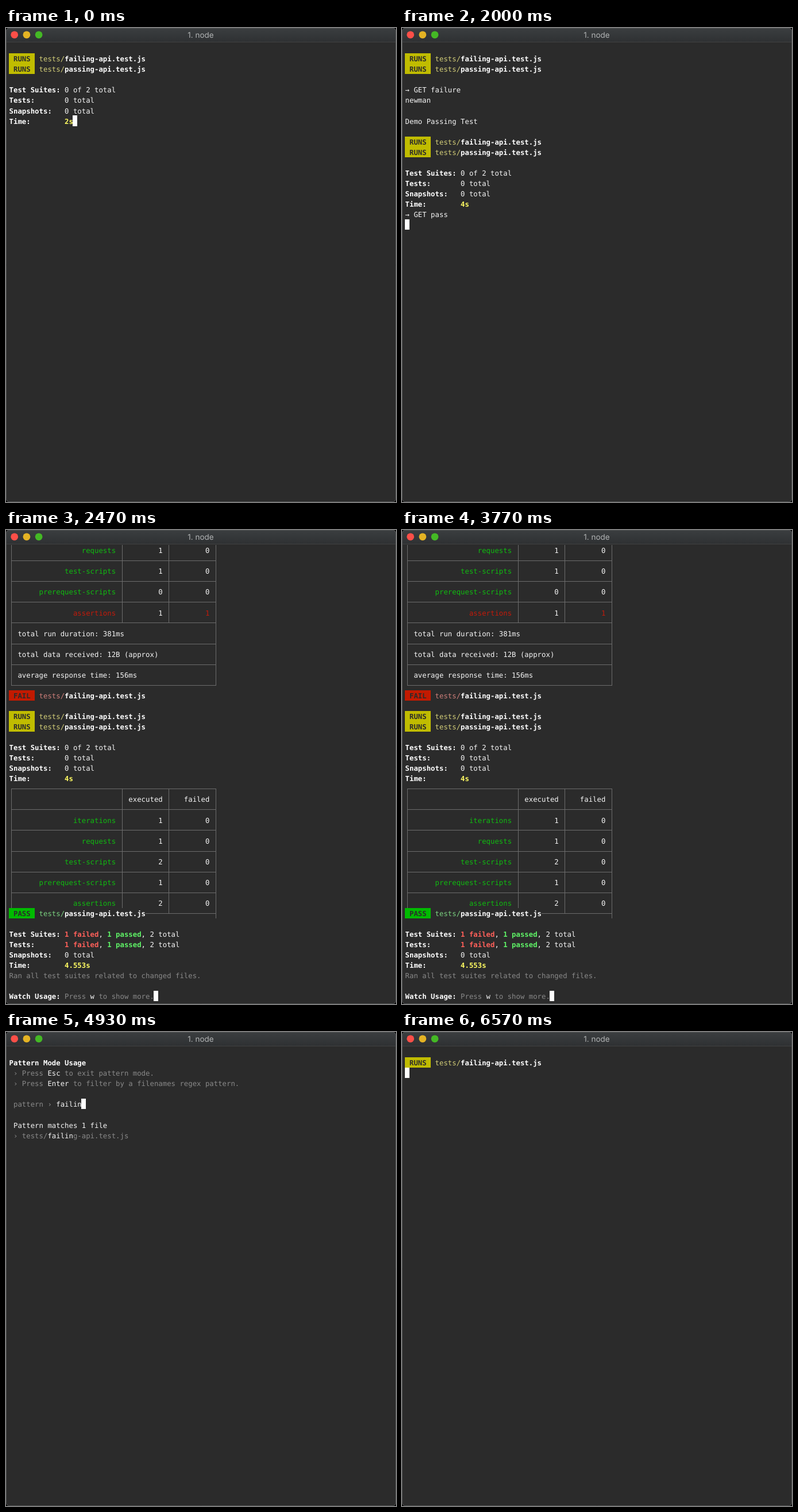
Animation of 679x825 px, one loop 8000 ms. Source, as an HTML page with a canvas:

```html
<!DOCTYPE html>
<html lang="en">
<head>
<meta charset="utf-8">
<title>Terminal</title>
<style>
  html, body { margin: 0; width: 100%; height: 100%; overflow: hidden; background: #000; }
  canvas { display: block; }
</style>
</head>
<body>
<canvas id="stage" width="679" height="825"></canvas>
<script>
const ctx = document.getElementById('stage').getContext('2d');
const W = 679, H = 825, LOOP = 8000;
const LEFT = 5.6, TOP = 26.6, CELL_W = 7.42, CELL_H = 18.05;
const MONO = '12.32px "DejaVu Sans Mono", "Liberation Mono", monospace';

// Style letter -> [text colour, bold, background]
const STYLES = {
  n: ['#f6f6f6'],
  b: ['#ffffff', true],
  d: ['#898989'],
  k: ['#5f5f5f'],
  l: ['#6c6c6c'],
  g: ['#10bb10'],
  r: ['#c41a0a'],
  o: ['#c2be1c'],
  y: ['#d3ce78'],
  p: ['#cf7f7a'],
  q: ['#7bd280'],
  t: ['#fffb62', true],
  e: ['#ff605a', true],
  s: ['#5ff567', true],
  Y: ['#2b2b2b', true, '#c0bc00'],
  R: ['#2b2b2b', true, '#c21a00'],
  G: ['#2b2b2b', true, '#00ba00']
};

// Box-drawing characters as the sides their strokes reach
const BOX = {
  '─': 'LR', '│': 'UD', '┌': 'RD', '┐': 'LD', '└': 'RU', '┘': 'LU',
  '├': 'UDR', '┤': 'UDL', '┬': 'LRD', '┴': 'LRU', '┼': 'LRUD'
};

// Text markup: "~x" switches to style x, "~_" places the cursor
const badge = (style, label, dim, name) =>
  `~${style} ${label} ~n ~${dim}tests/~b${name}-api.test.js`;
const runs = name => badge('Y', 'RUNS', 'y', name);
const bothRun = [runs('failing'), runs('passing')];
const stat = (label, value) => `~b${(label + ':').padEnd(13)}~n${value}`;
const stats = (time, suites = '0 of 2 total', tests = '0 total') => [
  stat('Test Suites', suites), stat('Tests', tests),
  stat('Snapshots', '0 total'), stat('Time', '~t' + time)
];

const rule = ([l, m, n, r]) =>
  '~l' + l + '─'.repeat(25) + m + '─'.repeat(10) + n + '─'.repeat(10) + r;
const row = (label, run, failed, style = 'g', failStyle = 'n') =>
  `~l│~${style}${label.padStart(24)} ~l│~n${run.padStart(9)} ~l│~${failStyle}${failed.padStart(9)} ~l│`;
const note = text => `~l│~n ${text.padEnd(46)}~l│`;
const grid = rows => rows.flatMap((r, i) => i ? [rule('├┼┼┤'), r] : [r]);
const head = row('', 'executed', 'failed');

const failTable = [
  rule('┌┬┬┐'),
  ...grid([
    head, row('iterations', '1', '0'), row('requests', '1', '0'),
    row('test-scripts', '1', '0'), row('prerequest-scripts', '0', '0'),
    row('assertions', '1', '1', 'r', 'r')
  ]),
  rule('├┴┴┤'), note('total run duration: 381ms'),
  rule('├──┤'), note('total data received: 12B (approx)'),
  rule('├──┤'), note('average response time: 156ms'),
  rule('└──┘')
];
const passTable = [
  rule('┌┬┬┐'),
  ...grid([
    head, row('iterations', '1', '0'), row('requests', '1', '0'),
    row('test-scripts', '2', '0'), row('prerequest-scripts', '1', '0'),
    row('assertions', '2', '0')
  ])
];

const waiting = time => ['', ...bothRun, '', ...stats(time + '~_')];
const started = [
  '', ...bothRun, '', '~n→ GET failure', '~nnewman', '', '~nDemo Passing Test', '',
  ...bothRun, '', ...stats('4s'), '~n→ GET pass'
];
const foo = '~k  GET http://localhost:1337/foo';
const both = foo + '    GET http://localhost:1337';
const log = [
  both + ' [404 Not Found, 119B, 156ms]',
  '~k[200 OK, 111B, 174ms]',
  '~e  1. responds with 200',
  '~g  ✓~k  responds with 200',
  '~g  ✓~k  returns correct body'
];
const logged = n => [...started, ...log.slice(0, n), '~_'];
const count = '~e1 failed~n, ~s1 passed~n, 2 total';
const finished = [
  ...failTable.slice(5), badge('R', 'FAIL', 'p', 'failing'), '',
  ...bothRun, '', ...stats('4s'), ...passTable,
  badge('G', 'PASS', 'q', 'passing') + '~l─────┴──────────┤', '',
  ...stats('4.553s', count, count),
  '~dRan all test suites related to changed files.', '',
  '~bWatch Usage: ~dPress ~nw~d to show more.~_'
];
const pattern = typed => [
  '', '~bPattern Mode Usage',
  '~d › Press ~nEsc~d to exit pattern mode.',
  '~d › Press ~nEnter~d to filter by a filenames regex pattern.', '',
  `~d pattern › ~n${typed}~_`, '',
  ...(typed
    ? ['~n Pattern matches 1 file',
       `~d › tests/~n${typed}~d${'failing'.slice(typed.length)}-api.test.js`]
    : ['~o Start typing to filter by a filename regex pattern.'])
];

const scenes = [
  [0, waiting('2s')],
  [1000, waiting('3s')],
  [2000, logged(0)],
  [2070, [...started, foo + '~_']],
  [2130, [...started, both + '~_']],
  [2270, [...started, log[0] + '~_']],
  [2300, logged(2)],
  [2330, logged(3)],
  [2370, logged(4)],
  [2400, logged(5)],
  [2430, [...started, ...log, '', ...failTable, '~_']],
  [2470, finished],
  [4130, pattern('')],
  [4570, pattern('f')],
  [4600, pattern('fa')],
  [4670, pattern('fai')],
  [4700, pattern('fail')],
  [4900, pattern('faili')],
  [4930, pattern('failin')],
  [6200, ['', runs('failing'), '~_']]
];

const cellX = col => Math.floor(LEFT + col * CELL_W);
const cellY = r => Math.floor(TOP + r * CELL_H);

function fillCells(col, r, n, color) {
  const x = cellX(col), y = cellY(r);
  ctx.fillStyle = color;
  ctx.fillRect(x, y, cellX(col + n) - x, cellY(r + 1) - y);
}

function drawBox(sides, col, r) {
  const x = cellX(col), y = cellY(r), right = cellX(col + 1), bottom = cellY(r + 1);
  const cx = Math.floor(LEFT + (col + .5) * CELL_W), cy = y + 9;
  const x0 = sides.includes('L') ? x : cx, x1 = sides.includes('R') ? right : cx + 1;
  const y0 = sides.includes('U') ? y : cy, y1 = sides.includes('D') ? bottom : cy + 1;
  ctx.fillRect(x0, cy, x1 - x0, 1);
  ctx.fillRect(cx, y0, 1, y1 - y0);
}

function drawLine(line, r) {
  let col = 0;
  for (const part of line.split('~').slice(1)) {
    if (part[0] === '_') {
      fillCells(col, r, 1, '#ffffff');
      continue;
    }
    const [color, bold, back] = STYLES[part[0]], text = part.slice(1);
    if (back) fillCells(col, r, text.length, back);
    ctx.fillStyle = color;
    ctx.font = (bold ? 'bold ' : '') + MONO;
    for (const ch of text) {
      if (BOX[ch]) drawBox(BOX[ch], col, r);
      else if (ch !== ' ') ctx.fillText(ch, LEFT + col * CELL_W, TOP + r * CELL_H + 13.6);
      col++;
    }
  }
}

function drawWindow() {
  ctx.fillStyle = '#000';
  ctx.fillRect(0, 0, W, H);
  ctx.save();
  ctx.beginPath();
  ctx.roundRect(0, 0, W, H, 5);
  ctx.clip();
  ctx.fillStyle = '#2b2b2b';
  ctx.fillRect(0, 0, W, H);
  const bar = ctx.createLinearGradient(0, 0, 0, 24);
  bar.addColorStop(0, '#3b3e40');
  bar.addColorStop(1, '#2f3133');
  ctx.fillStyle = bar;
  ctx.fillRect(0, 0, W, 24);
  ctx.fillStyle = '#414243';
  ctx.fillRect(0, 24, W, 1);
  ctx.restore();
  ctx.strokeStyle = '#505253';
  ctx.lineWidth = 1;
  ctx.beginPath();
  ctx.roundRect(.5, .5, W - 1, H - 1, 5);
  ctx.stroke();
  ['#fc4f48', '#e4b324', '#44b825'].forEach((color, i) => {
    ctx.fillStyle = color;
    ctx.beginPath();
    ctx.arc(14.7 + i * 21.2, 11.8, 6.4, 0, 7);
    ctx.fill();
  });
  ctx.fillStyle = '#b2b4b5';
  ctx.font = '13.5px Inter, Roboto, sans-serif';
  ctx.textAlign = 'center';
  ctx.fillText('1. node', 339, 17);
  ctx.textAlign = 'left';
}

function draw(now) {
  const t = now % LOOP;
  const [, lines] = scenes.findLast(([start]) => start <= t);
  drawWindow();
  lines.forEach(drawLine);
  requestAnimationFrame(draw);
}

ctx.textRendering = 'geometricPrecision';
draw(0);
</script>
</body>
</html>
```
